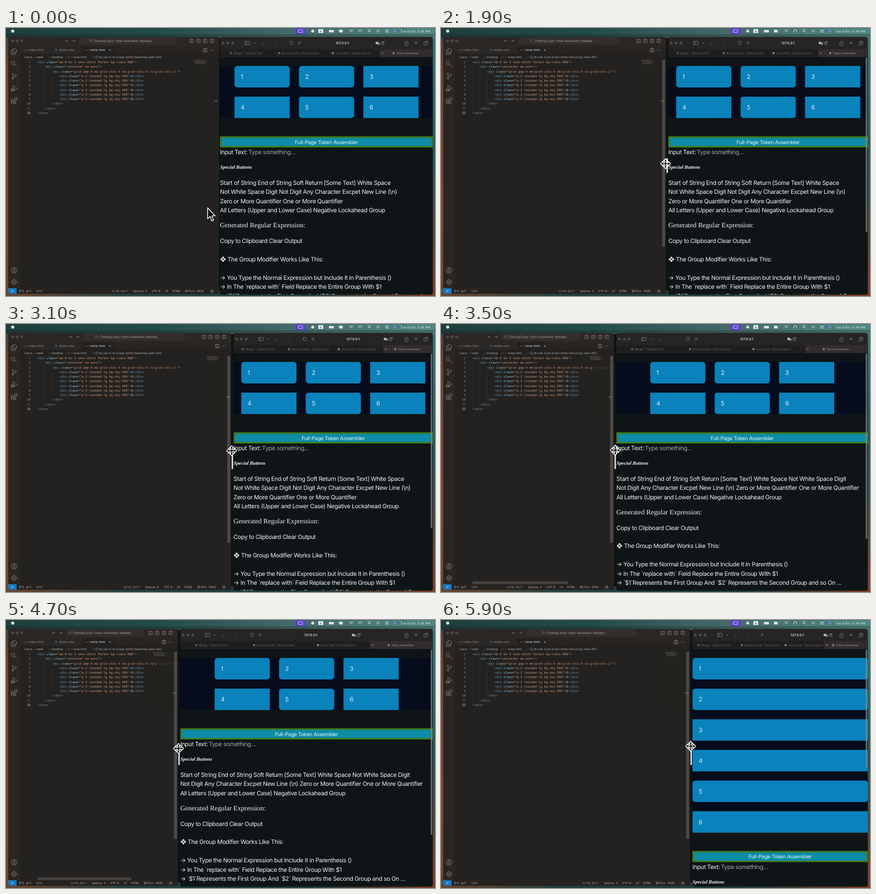
Recreate the animation shown at these times as an HTML page. Size 768 by 480 pixels, loop 6000 ms.

```html
<!DOCTYPE html>
<html lang="en">
<head>
<meta charset="utf-8">
<title>Resizing two windows</title>
<style>
  html, body { margin: 0; width: 100%; height: 100%; overflow: hidden; background: #111; }
  #stage { display: block; width: 100vw; height: 100vh; }
  text { font-family: Inter, "DejaVu Sans", sans-serif; white-space: pre; text-rendering: geometricPrecision; }
  .page { font-size: 10.6px; letter-spacing: -0.33px; }
  .bar { font-size: 9.4px; letter-spacing: -0.33px; }
  .code { font-family: "DejaVu Sans Mono", "Liberation Mono", monospace; font-size: 5.47px; }
  .serif { font-family: "Liberation Serif", serif; font-size: 12.25px; }
  .script { font-family: "Liberation Serif", serif; font-size: 8.8px; font-weight: bold; font-style: italic; }
</style>
</head>
<body>
<svg id="stage" viewBox="0 0 768 480">
  <defs>
    <linearGradient id="top"><stop offset="0" stop-color="#1f3f3c"/><stop offset=".35" stop-color="#214c4a"/><stop offset=".65" stop-color="#44686a"/><stop offset="1" stop-color="#4f8581"/></linearGradient>
    <linearGradient id="left" x2="0" y2="1"><stop offset="0" stop-color="#30423a"/><stop offset=".15" stop-color="#7a4029"/><stop offset=".7" stop-color="#84462b"/><stop offset="1" stop-color="#6a4530"/></linearGradient>
    <linearGradient id="right" x2="0" y2="1"><stop offset="0" stop-color="#2f7a76"/><stop offset=".5" stop-color="#2a5552"/><stop offset="1" stop-color="#7a4029"/></linearGradient>
    <linearGradient id="foot"><stop offset="0" stop-color="#6a4530"/><stop offset=".3" stop-color="#1f3f3e"/><stop offset=".7" stop-color="#1f3f3e"/><stop offset="1" stop-color="#7a4029"/></linearGradient>
  </defs>
  <g id="scene"></g>
</svg>
<script>
const LOOP = 6000, STEP = 100, DRAG = 1300, EDGE = 764;
const scene = document.getElementById('scene');

// Left edge of the browser window over time
const times = [0, DRAG, 1900, 2600, 3500, 4200, 5100, 5900];
const edges = [383, 383, 407, 486, 314, 201, 409, 450];

function segment(v, xs) {
  let i = 0;
  while (i < xs.length - 2 && v > xs[i + 1]) i++;
  return i;
}

function lin(v, xs, ys) {
  const i = segment(v, xs);
  const u = Math.min(1, Math.max(0, (v - xs[i]) / (xs[i + 1] - xs[i])));
  return ys[i] + (ys[i + 1] - ys[i]) * u;
}

// Monotone cubic: smooth, resting at each turning point
function smooth(v, xs, ys) {
  const slope = k => (ys[k + 1] - ys[k]) / (xs[k + 1] - xs[k]);
  const tangent = k => {
    if (k === 0) return 0;
    if (k === xs.length - 1) return slope(k - 1);
    const a = slope(k - 1), b = slope(k);
    return a * b > 0 ? 2 * a * b / (a + b) : 0;
  };
  const i = segment(v, xs), h = xs[i + 1] - xs[i], u = (v - xs[i]) / h;
  const u2 = u * u, u3 = u2 * u;
  return ys[i] * (2 * u3 - 3 * u2 + 1) + ys[i + 1] * (3 * u2 - 2 * u3)
    + h * (tangent(i) * (u3 - 2 * u2 + u) + tangent(i + 1) * (u3 - u2));
}

const esc = s => s.replace(/&/g, '&amp;').replace(/</g, '&lt;').replace(/>/g, '&gt;');
const rect = (x, y, w, h, fill, more = '') =>
  `<rect x="${x}" y="${y}" width="${Math.max(0, w)}" height="${h}" fill="${fill}" ${more}/>`;
const dot = (x, y, r, fill) => `<circle cx="${x}" cy="${y}" r="${r}" fill="${fill}"/>`;
const text = (x, y, s, fill, more = '') => `<text x="${x}" y="${y}" fill="${fill}" ${more}>${esc(s)}</text>`;
const small = (x, y, s, fill, more = '') => text(x, y, s, fill, `font-size="5.2" ${more}`);
const icon = (x, y, d, color, w = .8) =>
  `<path transform="translate(${x} ${y})" d="${d}" fill="none" stroke="${color}" stroke-width="${w}"/>`;
const pane = (x, y, w, h, body) =>
  `<svg x="${x}" y="${y}" width="${Math.max(0, w)}" height="${h}" viewBox="${x} ${y} ${Math.max(1, w)} ${h}">${body}</svg>`;
const mid = 'text-anchor="middle"';

const shape = {
  files: 'M-2-5H2L4-3V2H-2ZM-2-2H-5V5H2V2',
  search: 'M1-1.5A3 3 0 1 1-5-1.5A3 3 0 1 1 1-1.5M0 1L5 5',
  git: 'M-2-5A1.5 1.5 0 1 1-2.1-5M-2-2V3A1.5 1.5 0 1 1-2.1 3M3-3A1.5 1.5 0 1 1 2.9-3M3 0Q3 2-2 2',
  run: 'M-2-5L5 0L0 3M-2-5V0M-5 1H0V5H-5ZM-6 3H1',
  blocks: 'M-5-2H-1V5H-5ZM-5 1.5H3V5H-1M3 1.5V5M1-5H5V-1H1Z',
  user: 'M5 0A5 5 0 1 1-5 0A5 5 0 1 1 5 0M2-1.5A2 2 0 1 1-2-1.5A2 2 0 1 1 2-1.5M-3.5 3.5Q0 0 3.5 3.5',
  gear: 'M4 0A4 4 0 1 1-4 0A4 4 0 1 1 4 0M1.5 0A1.5 1.5 0 1 1-1.5 0A1.5 1.5 0 1 1 1.5 0M0-5.5V-4M0 4V5.5M-5.5 0H-4M4 0H5.5',
  box: 'M-3-3H3V3H-3ZM0-3V3',
  side: 'M-4-3H4V3H-4ZM-1.5-3V3',
  tag: 'M-1-1.5L-2.5 0L-1 1.5M1-1.5L2.5 0L1 1.5',
  back: 'M1.5-3L-1.5 0L1.5 3',
  next: 'M-1.5-3L1.5 0L-1.5 3',
  down: 'M-1.5-.8L0 .8L1.5-.8',
  arrowL: 'M2.5 0H-2.5M-.7-1.8L-2.5 0L-.7 1.8',
  arrowR: 'M-2.5 0H2.5M.7-1.8L2.5 0L.7 1.8',
  loop: 'M2-1.5A2.5 2.5 0 1 0 2.5 1M2.5-3V-1H.5',
  share: 'M-1.5-1H-3V4H3V-1H1.5M0 2V-4M-1.5-2.5L0-4L1.5-2.5',
  plus: 'M-3 0H3M0-3V3',
  stack: 'M-3-1H2V3.5H-3ZM-1-1V-3H4V1.5H2',
  lines: 'M-2.5-2H2.5M-2.5 0H2.5M-2.5 2H0',
  ring: 'M2 0A2 2 0 1 1-2 0A2 2 0 1 1 2 0',
  cross: 'M-1.5-1.5L1.5 1.5M1.5-1.5L-1.5 1.5',
  bell: 'M-2.5 1.5H2.5L1.7 0V-1.5Q0-3.5-1.7-1.5V0ZM-.5 2.5H.5',
  wifi: 'M-3.5-1Q0-4 3.5-1M-2 .8Q0-1 2 .8M-.4 2.3H.4'
};

function desktop() {
  const white = '#e2e9e8';
  return rect(0, 0, 768, 480, '#101213')
    + rect(0, 0, 10, 480, 'url(#left)') + rect(758, 0, 10, 480, 'url(#right)')
    + rect(0, 470, 768, 10, 'url(#foot)') + rect(0, 0, 768, 18, 'url(#top)')
    + rect(0, 11, 768, 5, '#10191a', 'opacity=".25"')
    + dot(12, 5.5, 2.8, white)
    + rect(518, 0, 18, 11, '#5a41c6') + rect(523, 3.2, 8, 4.6, 'none', `stroke="${white}" stroke-width=".8"`)
    + dot(549, 5.5, 2.6, white)
    + rect(559, 2, 9, 7, white, 'rx="1.2"') + small(563.5, 7.5, 'A', '#1e3c3b', mid)
    + rect(578, 3.5, 9, 4.2, white, 'rx="1"') + rect(596, 3, 7, 5, white, 'rx="2"')
    + icon(618, 5.5, shape.wifi, white) + icon(634, 5.5, 'M-2.5 2V0A2.5 2.5 0 0 1 2.5 0V2', white, 1)
    + icon(651, 5.5, 'M1-.8A2 2 0 1 1-3-.8A2 2 0 1 1 1-.8M.6.8L3 3', white)
    + icon(666, 5.5, shape.ring, white) + icon(682, 5.5, 'M-3-1.3H3M-3 1.5H3', white, 1.2)
    + dot(696, 5.5, 2.6, '#5e8fd0')
    + text(706, 7.6, 'Tue 8 Oct  5:36 PM', white, 'font-size="5.9"');
}

// Editor
const span = (s, fill) => `<tspan fill="${fill}">${esc(s)}</tspan>`;
const GRAY = '#828385', BLUE = '#569cd0';
const close = span('</', GRAY) + span('div', BLUE) + span('>', GRAY);
const open = names => span('<', GRAY) + span('div', BLUE) + span(' class', '#98cbe6') + span('=', '#b5b1ae')
  + span(`"${names}"`, '#cb8f70') + span('>', GRAY);
const source = [
  [0, open('mb-6 mt-4 text-white Parent bg-slate-900')],
  [1, open('container mx-auto')],
  [2, open('grid gap-4 md:grid-cols-4 sm:grid-cols-3 xs:grid-cols-2 ')],
  ...[1, 2, 3, 4, 5, 6].map(n => [3, open('p-3 rounded-lg bg-sky-500') + span(String(n), '#d2cecb') + close]),
  [2, close], [1, close], [0, close]
];

function titleBar(R) {
  const xs = [197, 311, 382, 483];
  const l = lin(R, xs, [65, 110, 132, 166]), r = lin(R, xs, [142, 250, 304, 375]);
  const c = (R + 36) / 2, ink = '#8b8785';
  let s = rect(4, 16, R - 4, 17, '#2a2725');
  for (const x of [12, 20, 28]) s += dot(x, 23, 2.6, '#4b4846');
  s += icon(l - 23, 23, shape.arrowL, ink, .7) + icon(l - 11, 23, shape.arrowR, ink, .7)
    + rect(l, 18, r - l, 10, '#312e2c', 'rx="2" stroke="#45413f" stroke-width=".5"')
    + pane(l + 1, 17, r - l - 2, 12,
        icon(c - 57, 23, 'M1-.6A1.7 1.7 0 1 1-2.4-.6A1.7 1.7 0 1 1 1-.6M.6.8L2.2 2.4', ink, .6)
        + text(c, 25, '[Testing] Easy Token Assembler WebApp', '#a5a19f', mid + ' font-size="5.35"'));
  for (const d of [49, 37, 25, 13]) s += icon(R - d, 23, shape.box, ink, .7);
  return s;
}

function fileTabs(R) {
  const d = Math.min(0, R - 221.5), ink = '#a09b99', wide = 'letter-spacing=".25"';
  const body = rect(25 + d, 33, 111, 13, '#2a2725') + rect(136 + d, 33, 58, 13, '#232120')
    + icon(35 + d, 39.5, shape.tag, '#c4643c') + small(40 + d, 41.3, 'index.html', ink, wide)
    + small(88 + d, 41.3, '#', '#4a9ac8') + small(95 + d, 41.3, 'styles.css', ink, wide)
    + icon(145 + d, 39.5, shape.tag, '#c4643c') + small(151 + d, 41.3, 'temp.html', '#f0ecea', wide)
    + icon(186 + d, 39.5, shape.cross, '#c9c5c2', .7);
  return pane(25, 33, R - 25, 13, body + rect(R - 33, 33, 33, 13, '#272422'))
    + icon(R - 25, 39.5, shape.box, '#98948f', .7)
    + [-2, 0, 2].map(k => dot(R - 13 + k, 39.5, .6, '#98948f')).join('');
}

function pathBar() {
  const ink = '#aaa6a3';
  return [[33, 'Users'], [55, 'nadir'], [82, 'Desktop'], [120, 'temp.html'],
    [166, 'div.mb-6.mt-4.text-white.Parent.bg-slate-900']].map(([x, s]) => small(x, 54, s, ink)).join('')
    + [51.5, 78.5, 108.5, 156].map(x => icon(x, 52.2, 'M-.6-1.3L.7 0L-.6 1.3', ink, .6)).join('')
    + icon(114, 52.2, shape.tag, '#c4643c', .7) + icon(162, 52.2, shape.ring, '#5a9ac4', .7);
}

function codeArea(R, drag) {
  let s = '';
  for (let k = 0; k < 3; k++) s += rect(56 + k * 13.2, 66 + k * 8.27, .5, 82 - k * 16.5, '#393634');
  source.forEach(([depth, line], i) => {
    const y = 63 + i * 8.27;
    s += text(44, y, String(i + 1), i === 11 ? '#e4e0dd' : '#857f7c', 'class="code" text-anchor="end"')
      + `<text class="code" x="${56 + depth * 13.2}" y="${y}">${line}</text>`;
  });
  s += rect(R - 39, 57, 32, 100, '#242220', 'opacity=".68"');
  for (let i = 0; i < 8; i++) s += rect(R - 46 + Math.min(i, 3), 57.5 + i, i === 2 ? 25 : 19, .5, '#66605b', 'opacity=".7"');
  if (R < 330) s += rect(lin(R, [197, 311], [84, 56]), 461, lin(R, [197, 311], [22, 172]), 5, '#454240');
  if (drag) s += rect(R - 7, 57, 5.5, 335, '#4b4947');
  return s + rect(R - 9, 130.5, 6, 1, '#8b8784');
}

function statusBar(R) {
  const ink = '#b5b1ae';
  let s = rect(4, 466, R - 4, 10, '#252220') + rect(4, 466, 15, 10, '#1478bd')
    + icon(11.5, 471, 'M-2-1L0 .5L-2 2M2-2L0-.5L2 1', '#dfeaf2', .7)
    + icon(25.5, 471, shape.ring, ink, .6) + small(29, 473, '0', ink)
    + icon(38, 471, 'M0-2L2.2 2H-2.2Z', ink, .6) + small(42, 473, '0', ink)
    + icon(57.5, 471, 'M-2-2Q-3 0-2 1.5M2-2Q3 0 2 1.5M0-1V2.5', ink, .6) + small(61.5, 473, '0', ink);
  for (const [d, label] of [[192, 'Ln 12, Col 7'], [154, 'Spaces: 4'], [121, 'UTF-8'], [97, 'LF'], [84, 'HTML'], [54.5, 'Port : 5500']])
    if (R - d > 70) s += small(R - d, 473, label, ink);
  return s + icon(R - 58.5, 471, shape.ring + 'M-1.4-1.4L1.4 1.4', ink, .6) + icon(R - 13, 471, shape.bell, ink, .7);
}

function editor(R, drag) {
  const side = [['files', 42], ['search', 64], ['git', 86], ['run', 108], ['blocks', 130], ['user', 434], ['gear', 455]];
  return `<clipPath id="win"><rect x="4" y="16" width="${R - 4}" height="460" rx="4"/></clipPath><g clip-path="url(#win)">`
    + rect(4, 16, R - 4, 460, '#242220') + titleBar(R)
    + rect(25, 33, R - 25, 13, '#272422') + fileTabs(R) + pathBar() + codeArea(R, drag)
    + rect(4, 31, 21, 435, '#292624')
    + side.map(([k, y]) => icon(14.5, y, shape[k], '#8c8885')).join('')
    + statusBar(R) + '</g>';
}

// Browser
function toolbar(L, W) {
  const ink = '#7d7977';
  const c = EDGE - lin(W, [278, 357, 450, 563], [112, 143, 217, 282]), half = .19 * W;
  const reader = c - .2 * W;
  let s = rect(L, 16, W, 22, '#272524');
  for (const d of [5.5, 14, 22.5]) s += dot(L + d, 27, 2.6, '#4b4947');
  return s + icon(L + 49, 27, shape.side, ink) + icon(L + 62, 27, shape.down, ink)
    + icon(L + 77, 27, shape.back, '#625f5d') + icon(L + 100, 27, shape.next, '#4d4a48')
    + (W > 340 ? icon(reader - 15, 27, 'M-2.5-3H2.5V0Q2.5 2.5 0 3.5Q-2.5 2.5-2.5 0Z', ink) : '')
    + icon(reader, 27, shape.lines, ink)
    + text(c, 29.2, '127.0.0.1', '#e4e2e0', mid + ' font-size="5.9" font-weight="600"')
    + rect(c + half - 12.5, 24.5, 4.5, 4.5, '#b9b6b4', 'rx="1"') + rect(c + half - 9, 26, 4, 4, '#8b8886', 'rx="1"')
    + icon(c + half, 27, shape.loop, '#b9b6b4')
    + icon(717, 27, shape.share, ink) + icon(734, 27, shape.plus, ink) + icon(751, 27, shape.stack, ink);
}

const tabs = [['Merge - Tailwind CSS', 60, '#4a5e64'], ['Browse Fonts - Plimsa Fonts', 78, '#6d6a68'],
  ['curvy font - Plimsa Search', 76, '#8a8785'], ['Token Assembler', 49, '#85817f']];

function siteTabs(L, W) {
  const q = W / 4;
  return rect(L, 38, W, 14, '#1c1b1a') + tabs.map(([label, w, color], i) => {
    const x = L + i * q, on = i === 3, at = x + Math.max(on ? 12 : 8, (q - w) / 2);
    return pane(x, 38, q - 1, 14, rect(x, 38, q, 14, on ? '#302d2c' : '#201f1e')
      + (on ? icon(x + 5, 45, shape.cross, '#a5a19f', .7) : '')
      + dot(at + 2, 45, 2, color) + text(at + 6.5, 47, label, on ? '#9a9694' : '#6b6866', 'font-size="5"'));
  }).join('');
}

const buttons = [['Start of String', 65], ['End of String', 60], ['Soft Return', 53], ['[Some Text]', 58],
  ['White Space', 59.5], ['Not White Space', 80.5], ['Digit', 21.3], ['Not Digit', 40.7],
  ['Any Character Excpet New Line (\\n)', 167.7], ['Zero or More Quantifier', 109],
  ['One or More Quantifier', 108], ['All Letters (Upper and Lower Case)', 163], ['Negative Lockahead Group', 129]];

function wrap(W) {
  const lines = [];
  let used = Infinity;
  for (const [label, w] of buttons) {
    if (used + 2.6 + w > W) { lines.push(label); used = w; }
    else { lines[lines.length - 1] += ' ' + label; used += 2.6 + w; }
  }
  return lines;
}

function cards(L, W) {
  const cols = W >= 527 ? 4 : W >= 329 ? 3 : 1;
  const total = cols === 4 ? 527 : cols === 3 ? 329.5 : W;
  const gap = 16.5, w = (total - gap * (cols - 1)) / cols, left = L + (W - total) / 2 + .3;
  const rows = Math.ceil(6 / cols);
  let s = rect(L, 68, W, rows * 54.9 - gap, '#060c1c');
  for (let i = 0; i < 6; i++) {
    const x = left + (i % cols) * (w + gap), y = 68 + Math.floor(i / cols) * 54.9;
    s += rect(x, y, w, 38.4, '#0a82bb', [0, 1, 4].includes(i) ? 'rx="5"' : '')
      + text(x + 11, y + 23.4, String(i + 1), '#dcecf4', 'font-size="11"');
  }
  return [s, (rows - 2) * 54.9];
}

function page(L, W, drag) {
  const [grid, d] = cards(L, W), ink = '#f0f2f3', cls = 'class="page"';
  const lines = wrap(W), end = 281 + d + 16.45 * (lines.length - 1);
  const put = (y, s) => text(L, y, s, ink, cls);
  let s = rect(L, 52, W, 426, '#0f1517') + grid
    + rect(L + 1.3, 195.3 + d, W - 2.6, 17.4, '#0c8ca6', 'stroke="#437a14" stroke-width="2.6"')
    + text(L + W / 2, 207.5 + d, 'Full-Page Token Assembler', '#e4f2f4', 'class="bar" ' + mid)
    + put(226 + d, 'Input Text:') + text(L + 51, 226 + d, 'Type something...', '#a2a5a7', cls)
    + `<g transform="translate(${L} ${252 + d}) skewX(-8)">${text(0, 0, 'Special Buttons', ink, 'class="script"')}</g>`;
  lines.forEach((line, i) => { s += put(281 + d + i * 16.45, line); });
  s += text(L, end + 26.8, 'Generated Regular Expression:', ink, 'class="serif"')
    + put(end + 54.7, 'Copy to Clipboard Clear Output')
    + put(end + 87.5, '❖ The Group Modifier Works Like This:')
    + put(end + 120.5, '→ You Type the Normal Expression but Include It in Parenthesis ()')
    + put(end + 137, '→ In The `replace with` Field Replace the Entire Group With $1')
    + put(end + 153.5, '→ `$1`Represents the First Group And `$2` Represents the Second Group and so On ...');
  if (drag) s += rect(760.3, 53, 2.8, d ? 212 : lin(W, [357, 450], [313, 332]), '#85888a', 'rx="1.4" opacity=".75"');
  return s;
}

function browser(L, drag) {
  const W = EDGE - L;
  return `<clipPath id="web"><rect x="${L}" y="16" width="${W}" height="461.5" rx="4"/></clipPath><g clip-path="url(#web)">`
    + toolbar(L, W) + siteTabs(L, W) + page(L, W, drag) + '</g>';
}

function pointer(t, L) {
  const ink = 'fill="#0a0a0a" stroke="#fff" stroke-width="1.4" stroke-linejoin="round"';
  if (t < DRAG) {
    const x = smooth(t, [0, 1200, DRAG], [361, 378, 378]), y = smooth(t, [0, 1200, DRAG], [322, 245, 245]);
    return `<path transform="translate(${x} ${y})" d="M0 0V19.5L4.5 15.5L7.3 23.5L10.6 22.2L7.6 14.4H13.3Z" ${ink}/>`;
  }
  const x = L + lin(t, times, [-3, -3, -5, -5, -2, -2, -4, -3]);
  const y = lin(t, times, [245, 245, 243, 228, 226, 229, 231, 226]);
  return rect(L - 3.4, 233, 2.6, 27, '#e2e2e2', 'rx="1.3"')
    + `<path transform="translate(${x} ${y})" d="M-9 0L-4.5-4.5V-1.5H-1.5V-5H-3.5L0-9L3.5-5H1.5V-1.5H4.5V-4.5L9 0L4.5 4.5V1.5H1.5V5H3.5L0 9L-3.5 5H-1.5V1.5H-4.5V4.5Z" ${ink}/>`;
}

function draw(t) {
  const L = smooth(t, times, edges), drag = t >= DRAG;
  const R = L - (drag ? 4.2 : 1.5);
  scene.innerHTML = desktop() + editor(R, drag) + browser(L, drag) + pointer(t, L);
}

let shown = -1;
function tick() {
  const t = Math.floor(performance.now() % LOOP / STEP) * STEP;
  if (t !== shown) draw(shown = t);
  requestAnimationFrame(tick);
}
tick();
</script>
</body>
</html>
```
